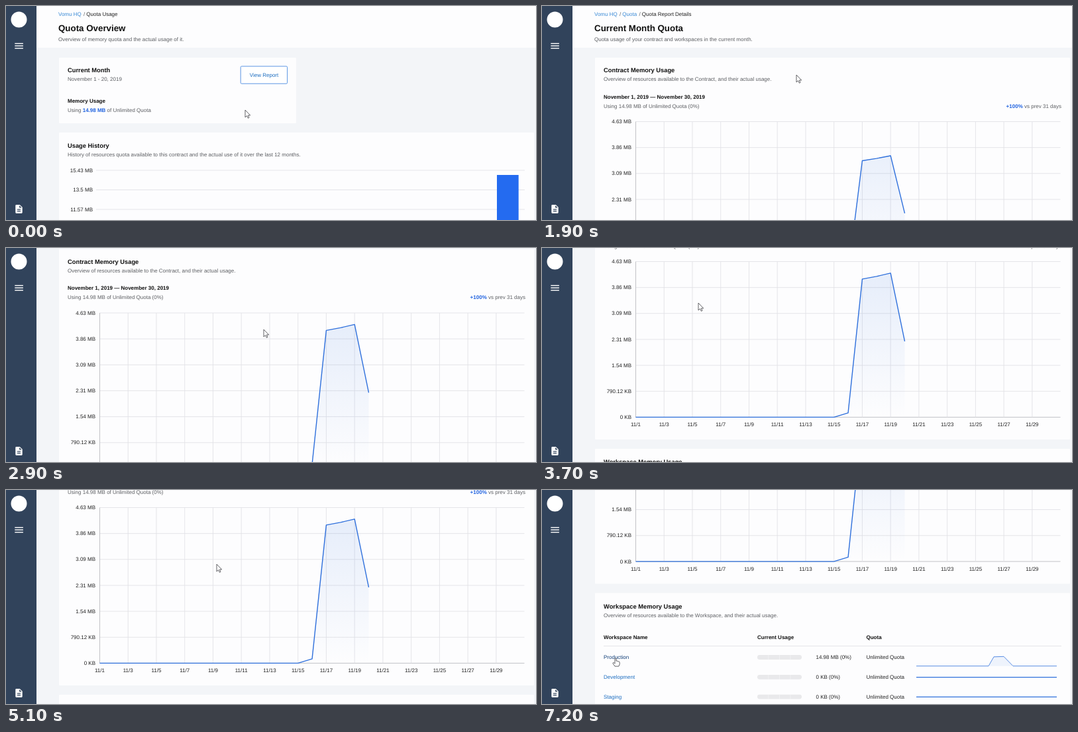
Animation of 800x323 px, one loop 8 s. Source, as an HTML page:

```html
<!DOCTYPE html>
<html lang="en">
<head>
<meta charset="utf-8">
<title>Quota usage</title>
<style>
  html, body { margin: 0; height: 100%; overflow: hidden; background: #f3f5f8; }
  svg { display: block; width: 100vw; height: 100vh; }
  text { font: 8px "Liberation Sans", Arial, sans-serif; fill: #222; white-space: pre; text-rendering: geometricPrecision; }
  .title { font-size: 13.33px; font-weight: bold; fill: #111; }
  .head { font-size: 9.33px; font-weight: bold; fill: #111; }
  .bold { font-weight: bold; fill: #111; }
  .soft { fill: #5d5f63; }
  .link { fill: #1c6dc0; }
  .crumb { fill: #3a8ad6; }
  .blue { font-weight: bold; fill: #2264e0; }
  .end { text-anchor: end; }
  .mid { text-anchor: middle; }
  .card { fill: #fdfdfe; }
  .grid { stroke: #e2e3e7; stroke-width: .9; }
  .axis { stroke: #bcbdc1; stroke-width: .9; }
  .line { fill: none; stroke: #2f70dc; stroke-width: 1.4; stroke-linejoin: round; }
  .hover { fill: #123f78; }
</style>
</head>
<body>
<svg id="stage" viewBox="0 0 800 323" preserveAspectRatio="none"></svg>
<script>
const LOOP = 8000, PAGE_SWITCH = 1400, GROW_START = 1530, GROW_TIME = 1000;

// [time, scroll]
const SCROLL = [[0, 0], [2450, 0], [2800, 76.5], [3150, 76.5], [3500, 154], [3720, 154],
  [4100, 301.5], [4550, 301.5], [5000, 148], [5220, 148], [5930, 301.5], [LOOP, 301.5]];
// [time, x, y]
const POINTER = [[0, 361, 157], [500, 361, 157], [900, 384, 104], [2200, 384, 104], [2800, 389, 123],
  [3100, 389, 123], [3400, 72, 110], [3700, 236, 83], [4200, 236, 83], [5100, 318, 112],
  [5800, 358, 134], [6150, 358, 124], [6300, 358, 124], [7200, 111, 253.5], [LOOP, 111, 253.5]];

const text = (x, y, content, cls = '') => `<text x="${x}" y="${y}" class="${cls}">${content}</text>`;
const rect = (x, y, w, h, attrs) => `<rect x="${x}" y="${y}" width="${w}" height="${h}" ${attrs}/>`;
const card = (x, y, w, h) => rect(x, y, w, h, 'class="card" rx="1"');
const line = (x1, y1, x2, y2, cls) => `<line x1="${x1}" y1="${y1}" x2="${x2}" y2="${y2}" class="${cls}"/>`;
const span = (content, cls) => `<tspan class="${cls}">${content}</tspan>`;

const header = (crumbs, title, subtitle) => {
  const last = crumbs.length - 1;
  const trail = crumbs.map((c, i) => span(c, i < last ? 'crumb' : '')).join(span(' / ', 'soft" dx="1'));
  return rect(46, 0, 754, 63, 'class="card"') + text(79, 14.9, trail) +
    text(79, 38.3, title, 'title') + text(79, 52.6, subtitle, 'soft');
};

const overviewPage = () =>
  header(['Vomu HQ', 'Quota Usage'], 'Quota Overview', 'Overview of memory quota and the actual usage of it.') +
  card(80, 78, 358, 99) +
  text(93, 100.4, 'Current Month', 'head') +
  text(93, 113.3, 'November 1 - 20, 2019', 'soft') +
  text(93, 146.4, 'Memory Usage', 'bold') +
  text(93, 159.8, `Using ${span('14.98 MB', 'blue')} of Unlimited Quota`, 'soft') +
  rect(354.2, 91, 70.4, 26.2, 'rx="1.5" fill="#fff" stroke="#4a8be0" stroke-width=".9"') +
  text(389.5, 107.2, 'View Report', 'link mid') +
  card(80, 191, 717, 200) +
  text(93, 214.2, 'Usage History', 'head') +
  text(93, 227, 'History of resources quota available to this contract and the actual use of it over the last 12 months.', 'soft') +
  ['15.43', '13.5', '11.57'].map((v, i) => {
    const y = 248 + i * 29.5;
    return line(136, y, 783, y, 'grid') + text(131, y + 2.6, v + ' MB', 'end');
  }).join('') +
  rect(741, 255, 32.7, 80, 'fill="#246bf0"');

// Line chart geometry
const LEFT = 141.5, RIGHT = 782.5, TOP = 174.5, BASE = 409.4, DAY = 21.37;
const dayX = day => LEFT + (day - 1) * DAY;
const HEIGHTS = [[1, 0], [15, 0], [16, 6.5], [17, 208.5], [18, 212.5], [19, 217.5], [20, 114.5]];

const chartGrid = () => {
  let out = '';
  ['4.63 MB', '3.86 MB', '3.09 MB', '2.31 MB', '1.54 MB', '790.12 KB', '0 KB'].forEach((label, i) => {
    const y = TOP + i * (BASE - TOP) / 6;
    out += line(LEFT, y, RIGHT, y, i < 6 ? 'grid' : 'axis') + text(135, y + 2.6, label, 'end');
  });
  for (let day = 1; day <= 29; day += 2) {
    const x = dayX(day);
    out += line(x, TOP, x, BASE, day > 1 ? 'grid' : 'axis') + text(x, BASE + 13.8, '11/' + day, 'mid');
  }
  return out;
};

const workspaceRow = (name, usage, i) => {
  const y = 554 + i * 29.8;
  const trend = i ? `M565 ${y + .3}H777` : `M565 ${y + 13.2}H674L682 ${y - .7}L697 ${y - 1.2}L711 ${y + 13.2}H777`;
  const notches = [341.5, 358, 374.5].map(x => rect(x, y - 3.4, .7, 6.8, 'fill="#f4f4f5"')).join('');
  return `<g id="row${i}">${text(93, y + 2.9, name, 'link')}</g>` +
    rect(325, y - 3.4, 67, 6.8, 'rx="3.4" fill="#e9e9eb"') + notches +
    text(413.5, y + 2.9, usage) + text(489.5, y + 2.9, 'Unlimited Quota') +
    `<path d="${trend}" class="line" style="stroke-width:${i ? 1.1 : .8};fill:${i ? 'none' : '#2f70dc12'}"/>`;
};

const detailsPage = () =>
  header(['Vomu HQ', 'Quota', 'Quota Report Details'], 'Current Month Quota',
    'Quota usage of your contract and workspaces in the current month.') +
  card(80, 78, 717, 365) +
  text(93, 100.4, 'Contract Memory Usage', 'head') +
  text(93, 113.4, 'Overview of resources available to the Contract, and their actual usage.', 'soft') +
  text(93, 139.8, 'November 1, 2019 — November 30, 2019', 'bold') +
  text(93, 153.8, 'Using 14.98 MB of Unlimited Quota (0%)', 'soft') +
  text(784, 153.8, span('+100%', 'blue') + ' vs prev 31 days', 'soft end') +
  chartGrid() +
  '<path id="area" fill="url(#fade)"/><path id="curve" class="line"/>' +
  card(80, 457, 717, 250) +
  text(93, 480.3, 'Workspace Memory Usage', 'head') +
  text(93, 493.2, 'Overview of resources available to the Workspace, and their actual usage.', 'soft') +
  text(93, 526.3, 'Workspace Name', 'bold') + text(325, 526.3, 'Current Usage', 'bold') +
  text(489.5, 526.3, 'Quota', 'bold') + line(93, 537, 784, 537, 'grid') +
  [['Production', '14.98 MB (0%)'], ['Development', '0 KB (0%)'], ['Staging', '0 KB (0%)']]
    .map(([name, usage], i) => workspaceRow(name, usage, i)).join('');

const sidebar = () =>
  rect(0, 0, 46, 323, 'fill="#31435b"') +
  '<circle cx="19.5" cy="20.5" r="12" fill="#fff"/>' +
  [56.6, 60.2, 63.8].map(y => rect(13.3, y - .7, 12.6, 1.4, 'fill="#fff"')).join('') +
  `<path transform="translate(11.7 298.6) scale(.65)" fill="#fff" fill-rule="evenodd"
    d="M14 2H6Q4 2 4 4V20Q4 22 6 22H18Q20 22 20 20V8ZM16 18H8V16H16ZM16 14H8V12H16ZM13 9V3.5L18.5 9Z"/>`;

const cursor = () =>
  `<g id="cursor" fill="#fff" stroke="#3c3c40" stroke-width=".8" stroke-linejoin="round">
    <path id="arrow" d="M0 0V11L2.6 8.7L4.3 12.3L6 11.5L4.4 8H7.7Z"/>
    <path id="hand" d="M-1 7V1Q0-.6 1 1V4.6Q2.2 3.8 2.9 5Q4.1 4.4 4.7 5.5Q6.2 5.2 6.2 7V9.4L4.8 12.6H-1L-4 8.3Q-4 6.6-2.5 7.1L-1 8.6Z"/>
  </g>`;

const $ = id => document.getElementById(id);
const show = (id, visible) => $(id).setAttribute('display', visible ? 'inline' : 'none');

$('stage').innerHTML =
  `<defs><linearGradient id="fade" gradientUnits="userSpaceOnUse" x1="0" y1="${TOP}" x2="0" y2="${BASE}">
    <stop stop-color="#2f70dc" stop-opacity=".12"/><stop offset="1" stop-color="#2f70dc" stop-opacity="0"/>
  </linearGradient></defs>` +
  rect(0, 0, 800, 323, 'fill="#f3f5f8"') +
  `<g id="overview">${overviewPage()}</g><g id="details">${detailsPage()}</g>` + sidebar() + cursor();

// Smoothly interpolate between keyed rows
const sample = (keys, t) => {
  const i = Math.max(1, keys.findIndex(k => k[0] > t));
  const [from, to] = [keys[i - 1], keys[i]];
  const u = (t - from[0]) / (to[0] - from[0]);
  const e = u * u * (3 - 2 * u);
  return from.slice(1).map((v, n) => v + (to[n + 1] - v) * e);
};

function drawChart(t) {
  const u = Math.min(1, Math.max(0, (t - GROW_START) / GROW_TIME));
  const grow = 1 - (1 - u) ** 4;
  const d = 'M' + HEIGHTS.map(([day, h]) => `${dayX(day)} ${BASE - h * grow}`).join('L');
  $('curve').setAttribute('d', d);
  $('area').setAttribute('d', `${d}V${BASE}Z`);
}

function frame() {
  const t = performance.now() % LOOP;
  const onDetails = t >= PAGE_SWITCH, overRow = t >= 7050;
  const pointing = overRow || (t >= 800 && !onDetails);
  const [x, y] = sample(POINTER, t);
  show('overview', !onDetails);
  show('details', onDetails);
  show('hand', pointing);
  show('arrow', !pointing);
  $('cursor').setAttribute('transform', `translate(${x} ${y})`);
  $('details').setAttribute('transform', `translate(0 ${-sample(SCROLL, t)[0]})`);
  $('row0').firstChild.classList.toggle('hover', overRow);
  drawChart(t);
  requestAnimationFrame(frame);
}
frame();
</script>
</body>
</html>
```
